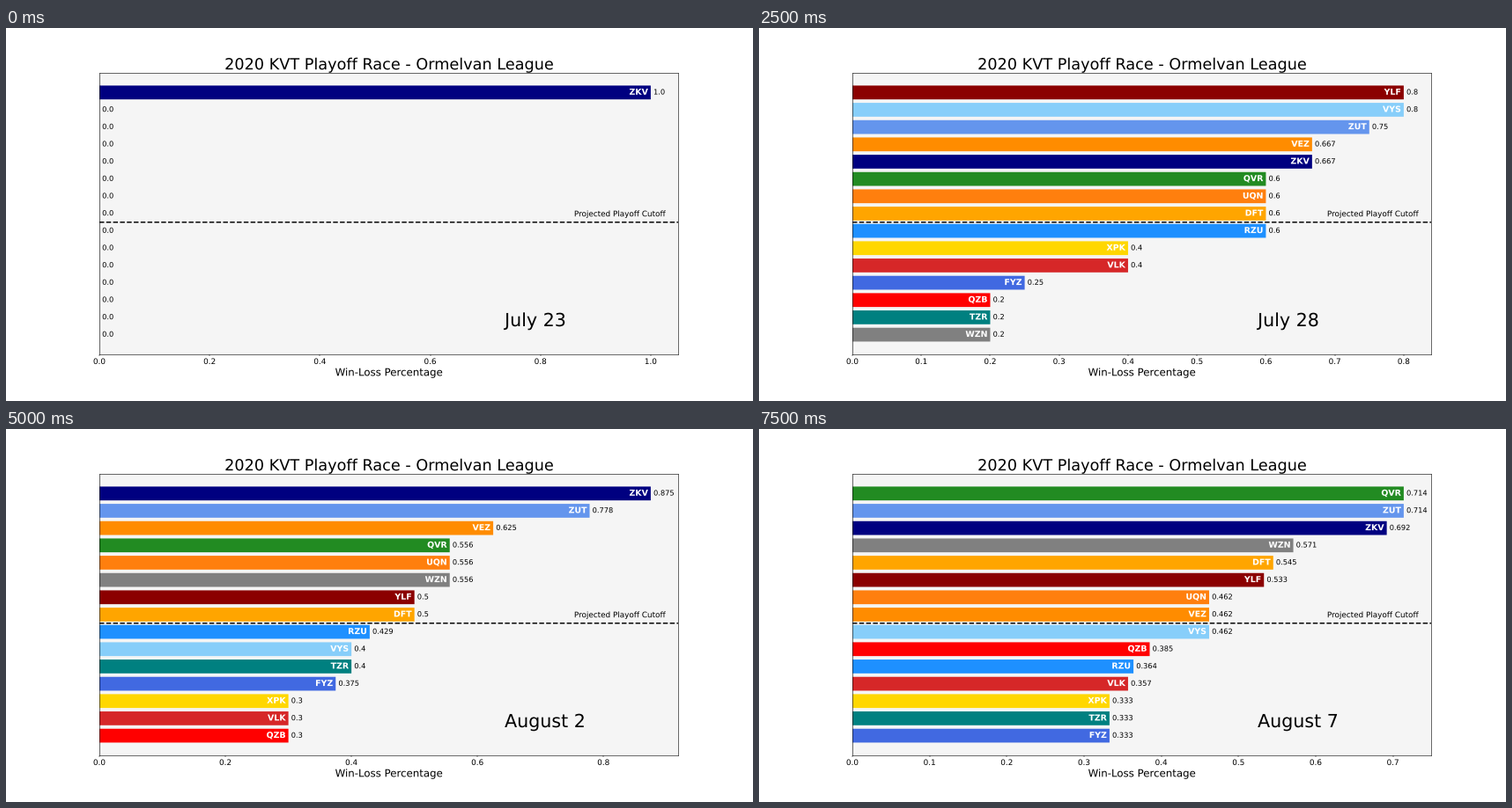
Write a matplotlib script that moves like this. It is 848 px wide and 424 px high and loops after 8000 ms.

```python
import matplotlib.pyplot as plt
from matplotlib.animation import FuncAnimation
from matplotlib.patheffects import Normal

# Text drawn as outlines keeps its sub-pixel position.
OUTLINE = [Normal()]
plt.rcParams.update({"font.family": "DejaVu Sans", "text.hinting": "none",
                     "axes.linewidth": 1})

# Daily results from July 23: W win, L loss, - idle,
# 2 two wins, 0 two losses, S split doubleheader.
TEAMS = [
    ("QVR", "forestgreen", "-WLWWLL-LWWWWWWW"),
    ("UQN", "tab:orange", "-WWLWLL-WLW-WLLL"),
    ("VEZ", "darkorange", "-LWW--LLWWW-L0LW"),
    ("ZUT", "cornflowerblue", "-WLW-WWLWWWWWWLL"),
    ("YLF", "darkred", "-WLW-2LWLLLLWWWL"),
    ("VYS", "lightskyblue", "-LWWWWLLLLL-WL-W"),
    ("ZKV", "navy", "W-LW--WWWWWW-SLL"),
    ("DFT", "orange", "-LWWLWWLL-S----W"),
    ("XPK", "gold", "-LWLWLLWLLLLLLWW"),
    ("VLK", "tab:red", "-LWLLWLLLWL-WLWL"),
    ("QZB", "red", "-WLLLLWWLLL-LW-W"),
    ("FYZ", "royalblue", "-WLL-LW-LLW-LLLW"),
    ("TZR", "teal", "-LLWLLWWWLLLLWLL"),
    ("WZN", "gray", "-LWL-0W-WWWWWLLW"),
    ("RZU", "dodgerblue", "-WLLWWLL----LWLL"),
]
WINS = {"W": 1, "2": 2, "S": 1}
GAMES = {"W": 1, "L": 1, "2": 2, "0": 2, "S": 2}
DAYS = 16

fig = plt.figure(figsize=(20, 10), dpi=42.4, facecolor="white")
ax = fig.add_axes([0.125, 0.125, 0.775, 0.755])


def standings(day):
    """Rows of (pct, wins, name, color), best first; ties keep list order."""
    rows = []
    for name, color, results in TEAMS:
        played = results[:day + 1]
        wins = sum(WINS.get(r, 0) for r in played)
        games = sum(GAMES.get(r, 0) for r in played)
        pct = round(wins / games, 3) if games else 0.0
        rows.append((pct, wins, name, color))
    return sorted(rows, key=lambda r: (-r[0], -r[1]))


def date_label(day):
    return f"July {23 + day}" if day < 9 else f"August {day - 8}"


def label(x, y, text, size, **kw):
    ax.text(x, y, text, size=size, path_effects=OUTLINE, **kw)


def draw(day):
    ax.clear()
    ax.set_facecolor("whitesmoke")
    rows = standings(day)
    best = rows[0][0]
    dx = best / 200
    for rank, (pct, _, name, color) in enumerate(rows):
        y = len(rows) - 1 - rank
        ax.barh(y, pct, color=color, snap=False)
        label(pct - dx, y, name, 16, weight="bold", color="white",
              ha="right", va="center")
        label(pct + dx, y, str(pct), 14, ha="left", va="center")

    ax.axhline(6.5, color="black", ls="--", lw=2.5, snap=False)
    label(0.82, 0.49, "Projected Playoff Cutoff", 15, transform=ax.transAxes)
    label(0.7, 0.1, date_label(day), 35, transform=ax.transAxes)

    ax.set_xlim(0, best * 1.05)
    ax.set_ylim(-1.14, 15.14)
    ax.set_yticks([])
    ax.tick_params(axis="x", labelsize=15)
    ax.set_xlabel("Win-Loss Percentage", size=20, path_effects=OUTLINE)
    ax.set_title("2020 KVT Playoff Race - Ormelvan League", size=30,
                 path_effects=OUTLINE)
    plt.setp(ax.get_xticklabels(), path_effects=OUTLINE)


anim = FuncAnimation(fig, draw, frames=DAYS, interval=500, repeat=True,
                     repeat_delay=0, init_func=lambda: draw(0))
plt.show()
```
